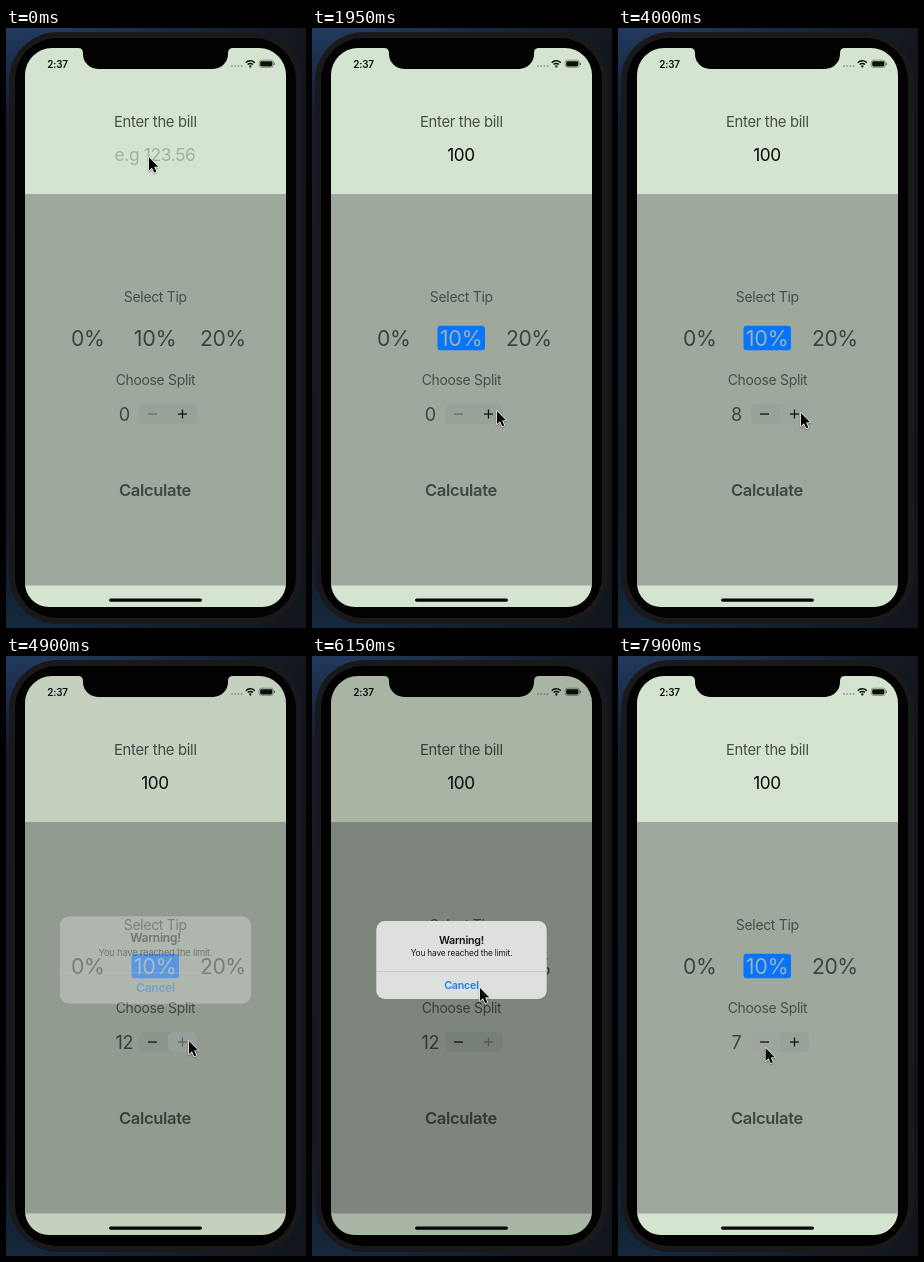
Animation, 300 px wide and 600 px high, one loop 8000 ms. Source, as an HTML page with a canvas:

```html
<!DOCTYPE html>
<html lang="en">
<head>
<meta charset="utf-8">
<title>Tip calculator</title>
<style>
html, body { margin: 0; width: 100%; height: 100%; overflow: hidden; background: #000; }
canvas { display: block; width: 300px; height: 600px; }
</style>
</head>
<body>
<canvas id="stage" width="300" height="600"></canvas>
<script>
const ctx = document.getElementById('stage').getContext('2d');
const LOOP = 8000;
const LIGHT = '#d5e4d0', PANEL = '#9ea99d', INK = '#474d48', DARK_INK = '#3d433f', BLUE = '#0674fd';

// Pointer tip positions: [time, x, y]
const pointerPath = [
  [0, 143, 129.3], [1130, 143, 129.3], [1450, 151, 312], [1620, 151, 312],
  [1950, 185, 383], [2200, 183, 385], [5570, 183, 385], [6140, 168, 332],
  [6520, 168, 332], [6950, 147.6, 392], [LOOP, 147.6, 392]
];
const TAP_TIP = 1480;
const PLUS = { start: 2100, gap: 245, count: 12 };
const MINUS = { start: 7000, gap: 210, count: 5 };
const ALERT_IN = 4812, ALERT_OUT = 6268;

function clicks(t, run) {
  return Math.max(0, Math.min(run.count, Math.floor((t - run.start) / run.gap) + 1));
}

// Highlight left by the latest click, fading from 1 to 0
function pressGlow(t, run) {
  const n = clicks(t, run);
  return n ? Math.max(0, 1 - (t - run.start - (n - 1) * run.gap) / 240) : 0;
}

// Critically damped spring from 0 to 1
function spring(ms) {
  const k = Math.max(0, ms) * 0.015;
  return 1 - (1 + k) * Math.exp(-k);
}

function pointerAt(t) {
  let i = 1;
  while (i < pointerPath.length - 1 && t > pointerPath[i][0]) i++;
  const [t0, x0, y0] = pointerPath[i - 1], [t1, x1, y1] = pointerPath[i];
  const u = (t - t0) / (t1 - t0), e = u * u * (3 - 2 * u);
  return [x0 + (x1 - x0) * e, y0 + (y1 - y0) * e];
}

function box(x, y, w, h, r, fill) {
  ctx.beginPath();
  ctx.roundRect(x, y, w, h, r);
  ctx.fillStyle = fill;
  ctx.fill();
}

// y is the middle of the capital letters
function label(s, x, y, size, color = INK, weight = 400) {
  ctx.font = `${weight} ${size}px Inter, Roboto, sans-serif`;
  ctx.letterSpacing = `${-0.02 * size}px`;
  ctx.textAlign = 'center';
  ctx.fillStyle = color;
  ctx.fillText(s, x, y + size * 0.36);
}

function drawPhone() {
  const wall = ctx.createLinearGradient(0, 0, 30, 600);
  wall.addColorStop(0, '#223a5e');
  wall.addColorStop(0.15, '#111c30');
  wall.addColorStop(0.8, '#0e1828');
  wall.addColorStop(1, '#14283c');
  ctx.fillStyle = wall;
  ctx.fillRect(0, 0, 300, 600);
  const shade = ctx.createLinearGradient(60, 0, 300, 0);
  shade.addColorStop(0, 'rgba(18,19,23,0)');
  shade.addColorStop(1, 'rgba(18,19,23,.9)');
  ctx.fillStyle = shade;
  ctx.fillRect(0, 0, 300, 600);
  box(3, 4, 293, 592, 49, '#19191b');
  box(9, 10, 281, 580, 42, '#020202');
}

function drawNotch() {
  ctx.fillStyle = '#020202';
  ctx.beginPath();
  ctx.moveTo(72, 19);
  ctx.lineTo(72, 20);
  ctx.quadraticCurveTo(77, 20, 77, 25);
  ctx.arcTo(77, 41, 92, 41, 15);
  ctx.arcTo(222, 41, 222, 25, 15);
  ctx.lineTo(222, 25);
  ctx.quadraticCurveTo(222, 20, 227, 20);
  ctx.lineTo(227, 19);
  ctx.fill();
}

function drawStatus() {
  label('2:37', 51.5, 36, 9.9, '#0c0f0c', 600);
  for (let i = 0; i < 4; i++) box(225 + i * 3.2, 37, 2, 2, 1, '#9aa597');
  ctx.strokeStyle = '#0c0f0c';
  ctx.lineWidth = 1.5;
  for (const r of [3.6, 6.2]) {
    ctx.beginPath();
    ctx.arc(244.3, 39, r, -Math.PI * 0.76, -Math.PI * 0.24);
    ctx.stroke();
  }
  box(243.2, 37.2, 2.3, 2.3, 1.1, '#0c0f0c');
  ctx.lineWidth = 0.7;
  ctx.strokeStyle = '#6d776c';
  ctx.beginPath();
  ctx.roundRect(253.2, 32.2, 14.2, 7.2, 2.2);
  ctx.stroke();
  box(254.2, 33.2, 12.2, 5.2, 1.3, '#0c0f0c');
  box(268, 34.5, 1, 2.6, 0.5, '#6d776c');
}

function drawField(t) {
  const typed = t < 400 ? '' : t < 700 ? '1' : t < 800 ? '10' : '100';
  label('Enter the bill', 149.3, 93.5, 14.8);
  if (typed) label(typed, 149, 127, 17.2, '#050605');
  else label('e.g 123.56', 149, 127, 17.4, '#a3afa0');
  if (t >= 75 && t < TAP_TIP) {
    const caretX = typed ? 150 + ctx.measureText(typed).width / 2 : 108;
    box(caretX, 116, 1.4, 21, 0.7, '#3f74e0');
  }
}

function drawStepper(t) {
  const value = clicks(t, PLUS) - clicks(t, MINUS);
  label(String(value), 118.3, 386.5, 18, DARK_INK);
  box(133, 376, 58, 20, 5, '#97a298');
  box(162, 376, 29, 20, 5, `rgba(190,195,198,${0.6 * pressGlow(t, PLUS)})`);
  box(133, 376, 29, 20, 5, `rgba(190,195,198,${0.2 * pressGlow(t, MINUS)})`);
  const off = '#687069', on = '#121512';
  ctx.fillStyle = value > 0 ? on : off;
  ctx.fillRect(142, 385.4, 9, 1.3);
  ctx.fillStyle = value < 12 ? on : off;
  ctx.fillRect(172, 385.4, 9, 1.3);
  ctx.fillRect(175.85, 381.5, 1.3, 9);
}

function drawForm(t) {
  ctx.fillStyle = LIGHT;
  ctx.fillRect(19, 20, 261, 559);
  ctx.fillStyle = PANEL;
  ctx.fillRect(19, 166, 261, 391.5);
  drawStatus();
  drawField(t);
  label('Select Tip', 149.3, 268.5, 13.9);
  const chosen = t >= TAP_TIP;
  if (chosen) box(125.5, 297.8, 47.5, 24.5, 3, BLUE);
  label('0%', 81.7, 310.5, 21.2, DARK_INK);
  label('10%', 149, 310.5, 21.6, chosen ? '#9db0b2' : DARK_INK);
  label('20%', 216.8, 310.5, 21.2, DARK_INK);
  label('Choose Split', 149.5, 352, 13.9);
  drawStepper(t);
  label('Calculate', 149, 462.5, 16.5, '#3f4540', 600);
  box(103, 570.4, 93, 3.4, 1.7, '#050605');
}

function drawAlert(t) {
  if (t < ALERT_IN || t > ALERT_OUT + 700) return;
  const enter = spring(t - ALERT_IN);
  const shown = enter * (1 - spring(t - ALERT_OUT));
  ctx.fillStyle = `rgba(0,0,0,${0.21 * shown})`;
  ctx.fillRect(19, 20, 261, 559);

  const scale = 1.2 - 0.2 * enter;
  ctx.save();
  ctx.globalAlpha = shown;
  ctx.translate(149.5, 304);
  ctx.scale(scale, scale);
  ctx.translate(-149.5, -304);
  box(64.3, 265, 170.4, 78, 8.5, '#dde0dc');
  ctx.fillStyle = '#bfc4be';
  ctx.fillRect(64.3, 315, 170.4, 0.8);
  label('Warning!', 149.5, 284, 10.7, '#101210', 600);
  label('You have reached the limit.', 149.5, 297.3, 8.3, '#161816');
  label('Cancel', 149.5, 329, 10.7, '#1b80f2', 600);
  ctx.restore();
}

function drawPointer(t) {
  const [x, y] = pointerAt(t);
  const shape = [[0, 0], [0, 14.5], [3.3, 11.5], [5.8, 17], [8.1, 16], [5.7, 10.6], [10.2, 10.4]];
  ctx.save();
  ctx.translate(x, y);
  ctx.scale(0.9, 0.9);
  ctx.beginPath();
  shape.forEach(([px, py]) => ctx.lineTo(px, py));
  ctx.closePath();
  ctx.shadowColor = 'rgba(0,0,0,.35)';
  ctx.shadowBlur = 2;
  ctx.shadowOffsetY = 1;
  ctx.lineWidth = 1.6;
  ctx.lineJoin = 'round';
  ctx.strokeStyle = '#f4f6f4';
  ctx.stroke();
  ctx.shadowColor = 'transparent';
  ctx.fillStyle = '#050505';
  ctx.fill();
  ctx.restore();
}

function draw(t) {
  drawPhone();
  ctx.save();
  ctx.beginPath();
  ctx.roundRect(19, 20, 261, 559, [27, 27, 24, 24]);
  ctx.clip();
  drawForm(t);
  drawAlert(t);
  ctx.restore();
  drawNotch();
  drawPointer(t);
}

const began = performance.now();
function tick() {
  draw((performance.now() - began) % LOOP);
  requestAnimationFrame(tick);
}
tick();
</script>
</body>
</html>
```
